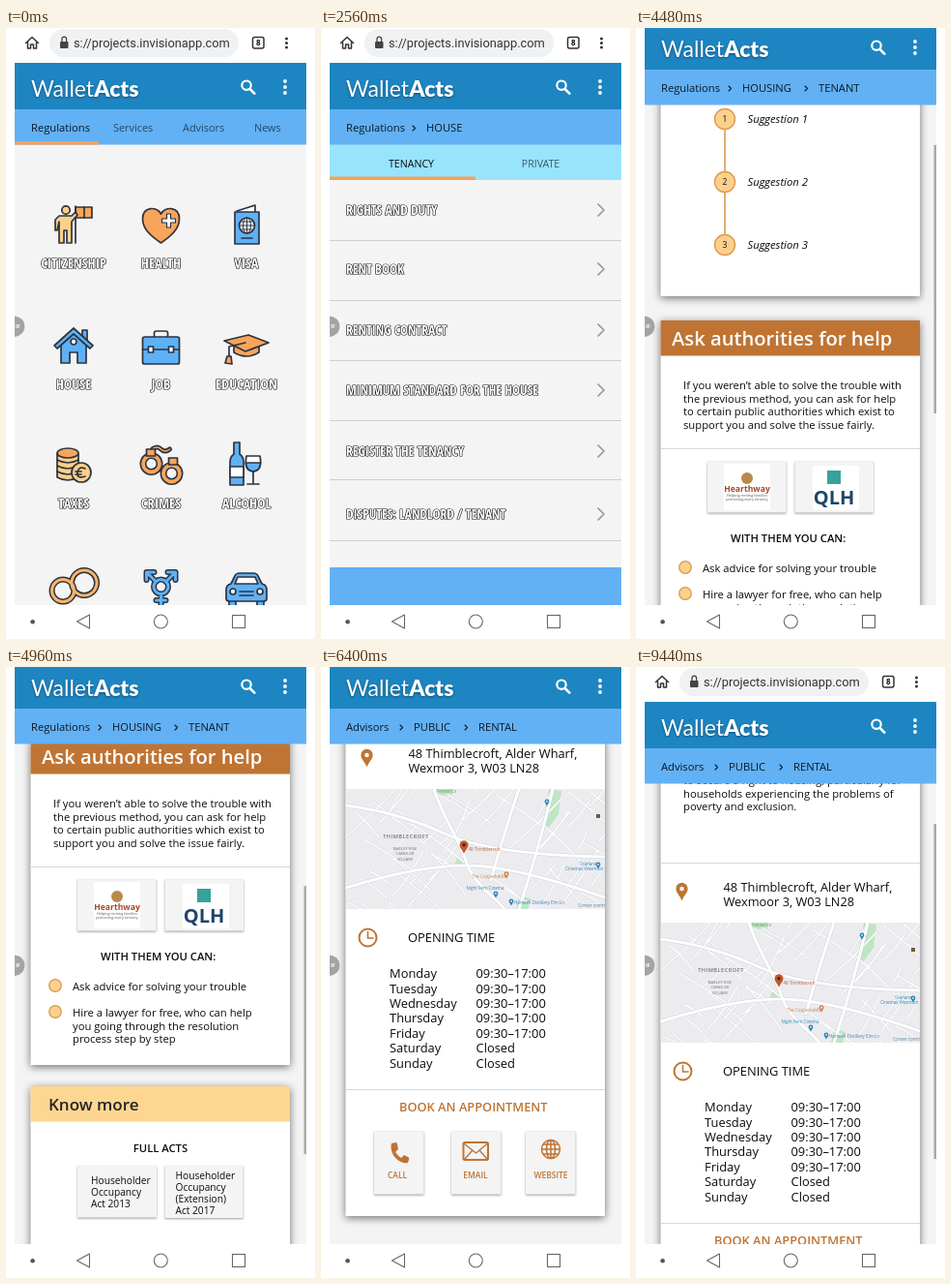
Animation, 320 px wide and 631 px high, one loop 9.6 s. Source, as an HTML page:

```html
<!DOCTYPE html>
<html lang="en">
<head>
<meta charset="utf-8">
<title>Pocket guide walkthrough</title>
<style>
html, body { margin: 0; width: 100%; height: 100%; overflow: hidden; background: #fff; }
svg { display: block; width: 320px; height: 631px; font-family: "Open Sans", "Noto Sans", sans-serif; }
.card { filter: drop-shadow(0 2px 4px rgba(0,0,0,.55)); }
.tile { filter: drop-shadow(0 1px 1px rgba(0,0,0,.4)); }
.caps { font-family: "Open Sans Condensed", "Open Sans", "Noto Sans", sans-serif; font-stretch: 75%;
  fill: #fff; stroke: #111; stroke-width: 1.2px; paint-order: stroke; stroke-linejoin: round; }
.ico { stroke: #2d3340; stroke-width: 1.7; stroke-linejoin: round; stroke-linecap: round; fill: none; }
.ico .b { fill: #5fb1f5; } .ico .o { fill: #f8a55c; } .ico .y { fill: #fbd08a; } .ico .w { fill: #fff; }
.line { fill: none; stroke-linecap: round; stroke-linejoin: round; }
</style>
</head>
<body>
<svg id="stage" viewBox="0 0 320 631"></svg>
<script>
const INK = '#0c0c0c', NAVY = '#0d1824', BROWN = '#bf7433', SAND = '#fdd691';

// Text helper: y is the middle of the capitals.
const txt = (x, y, s, size = 11.25, attrs = '') =>
  `<text x="${x}" y="${(y + size * .357).toFixed(2)}" font-size="${size}" ${/fill=|class=/.test(attrs) ? '' : `fill="${INK}"`} ${attrs}>${s}</text>`;
const mid = (x, y, s, size, attrs = '') => txt(x, y, s, size, `text-anchor="middle" ${attrs}`);
const lines = (x, y, step, rows, size) => rows.map((r, i) => txt(x, y + i * step, r, size)).join('');
const box = (x, y, w, h, fill, attrs = '') =>
  `<rect x="${x}" y="${y}" width="${w}" height="${h}" fill="${fill}" ${attrs}/>`;
const dot = (x, y, r, fill, attrs = '') => `<circle cx="${x}" cy="${y}" r="${r}" fill="${fill}" ${attrs}/>`;
const path = (d, stroke, w = 1, attrs = '') =>
  `<path class="line" d="${d}" stroke="${stroke}" stroke-width="${w}" ${attrs}/>`;
const group = (id, s) => `<g id="${id}">${s}</g>`;
const card = (y, h, title, fill, color, x, size) =>
  box(25.5, y, 268.5, h, '#fff', 'class="card"') +
  (title ? box(25.5, y, 268.5, 36.5, fill) + txt(x, y + 18.5, title, size, `font-weight="600" fill="${color}"`) : '');
const tile = (x, y, w, h) => box(x, y, w, h, '#f4f4f4', 'class="tile"');
const rule = y => box(25.5, y, 268.5, 1, '#d8d8d8');
const twoTone = (d, color, outer, inner) =>
  `<path d="${d}" stroke-width="${outer}"/><path d="${d}" stroke="${color}" stroke-width="${inner}"/>`;
const ring = (x, y, r) => `M${x - r} ${y}a${r} ${r} 0 1 1 ${2 * r} 0a${r} ${r} 0 1 1 ${-2 * r} 0`;
const SEMI = 'font-weight="600"';
const ORANGE = '#f8a55c', BLUE = '#5fb1f5';

// Home icons, drawn around their own centre.
const ICONS = {
  CITIZENSHIP: `<path class="o" d="M2-18h17v11H2z"/><path d="M2-19V19M11-18v11"/><circle class="y" cx="-8" cy="-15" r="4.200"/>
    <path class="y" d="M-15-9h13l4-4 2 3-6 7v22h-5V6h-3v13h-5V-3l-2 9h-2V-5z"/>`,
  HEALTH: `<path class="o" d="M0 19C-10 12-19 5-19-6c0-13 15-13 19-5 4-8 19-8 19 5C19 5 10 12 0 19z"/>
    <path class="w" stroke-width="1.200" d="M6-11h4v5h5v4h-5v5H6v-5H1v-4h5z"/>`,
  VISA: `<path class="w" d="M-10-14L9-20v7"/><path class="b" d="M-12-13H13V20H-12z"/><circle class="w" cx=".5" cy="1" r="8"/>
    <path stroke-width="1" d="M-7 1H8M.5-7V9M-5-3H6M-5 5H6"/><ellipse cx=".5" cy="1" rx="4" ry="8" stroke-width="1"/><path d="M-5 14H6"/>`,
  HOUSE: `<path class="b" d="M9-16h5v11H9z"/><path class="b" d="M-13-2L0-14 13-2V18H4V7h-8v11h-9z"/>
    <path class="b" d="M-20 0L0-18 20 0l-3 3L0-12-17 3z"/><circle class="w" cx="0" cy="-4" r="3"/>`,
  JOB: `<path d="M-7-9v-4q0-2 2-2H5q2 0 2 2v4"/><rect class="b" x="-19" y="-9" width="38" height="28" rx="2"/>
    <path d="M-19 4h38"/><path class="w" d="M-13 1h5v6h-5zM8 1h5v6H8z"/>`,
  EDUCATION: `<path class="o" d="M-13-3v10q13 8 26 0V-3"/><path class="o" d="M-23-5L2-11 23-3-1 6z"/>
    <path d="M-1-3L-18 1V11"/><path class="o" d="M-20 11h4l1 8-7-1z"/>`,
  TAXES: `<path class="y" d="M-17-10V14q11 6 22 0V-10"/><path d="M-17-4q11 6 22 0M-17 2q11 6 22 0M-17 8q11 6 22 0"/>
    <ellipse class="o" cx="-6" cy="-11" rx="11" ry="5"/><circle class="y" cx="8" cy="9" r="10"/>
    <path d="M12 5q-7-3-8 4t8 4M2 8h6M2 11h6"/>`,
  CRIMES: twoTone('M-9-15q5-4 9 0t9 0', ORANGE, 5, 1.500) + twoTone(ring(-10, 0, 8.500) + ring(11, 10, 8.500), ORANGE, 7, 3.800) +
    '<path class="o" d="M-15-15h9v7h-9zM8-6h9v7H8z"/>',
  ALCOHOL: `<path class="b" d="M-13-22h6v12q4 3 4 8v24h-14V-2q0-5 4-8z"/><path class="w" d="M-17 3h14v11h-14z"/>
    <path class="w" d="M0-8h14q3 15-7 16-10-1-7-16z"/><path class="b" d="M-.5-1h15q0 8-7.500 9-7.500-1-7.500-9z"/><path d="M7 8v13M1 21h12"/>`
};
const ARROWS = 'M5-5l9-9M7-15h8v8M-5-5l-9-9M-7-15h-8v8M0 8v12M-5 14H5';
const LAST_ROW = [
  twoTone(ring(-11, 4, 11.500) + ring(11, -4, 13), '#f8b568', 6, 3),
  twoTone(ARROWS + ring(0, 0, 7.500), BLUE, 6, 3),
  `<path class="b" d="M-18 13h7v7h-7zM11 13h7v7h-7z"/><path class="b" d="M-21 3q0-5 5-6l4-8q1-3 5-3H7q4 0 5 3l4 8q5 1 5 6v9q0 3-3 3H-18q-3 0-3-3z"/>
    <path class="w" d="M-12-3l3-7H9l3 7z"/><circle class="w" cx="-14" cy="5" r="3"/><circle class="w" cx="14" cy="5" r="3"/><path d="M-7 9H7M-7 5H7"/>`
];
const COLS = [70, 160.5, 249];
const icon = (x, y, s) => `<g class="ico" transform="translate(${x} ${y})">${s}</g>`;
const homePage = () => Object.entries(ICONS).map(([name, art], i) => {
  const x = COLS[i % 3], row = i / 3 | 0;
  return icon(x, [203, 328, 450][row], art) + mid(x, [243, 368, 491][row], name, 14.3, 'class="caps"');
}).join('') + LAST_ROW.map((art, i) => icon(COLS[i], 577, art)).join('');

const listPage = () => box(9, 120, 302, 37, '#99e4fd') + box(9, 153.5, 151, 3.5, '#f3a15d') +
  mid(93.5, 140, 'TENANCY', 10.6) + mid(227.5, 140, 'PRIVATE', 10.6, 'fill="#35586b"') +
  [['RIGHTS AND DUTY', 188, 219], ['RENT BOOK', 249, 281], ['RENTING CONTRACT', 312, 343],
    ['MINIMUM STANDARD FOR THE HOUSE', 374, 405], ['REGISTER THE TENANCY', 437, 466], ['DISPUTES: LANDLORD / TENANT', 502, 529]]
    .map(([s, y, b]) => txt(26, y, s, 13.5, 'class="caps"') + path(`M287 ${y - 6}l6 6-6 6`, '#999', 1.7) + box(9, b, 302, 1, '#cfcfcf')).join('') +
  box(9, 557, 302, 39, '#62b1f4');

const badge = (x, y, name, tag) => dot(x, y - 7, 6, '#b98a4c') + mid(x, y + 4, name, 8.6, 'font-weight="700" fill="#a8482b"') +
  tag.map((s, i) => mid(x, y + 10.5 + i * 4, s, 3.8, 'fill="#555"')).join('');
const TAG = ['Helping renting families', 'protecting every tenancy'];

function tenantPage() {
  const first = card(-38, 444, 'Speak with each other', BROWN, '#fff', 37, 20.2) +
    lines(45, 36, 13.5, ['Before you start any other procedure,', 'try to find a solution together with', 'the other side of the contract.',
      'As the relation between you and your', 'landlord should be respectful from both',
      'the sides, the best practice is to solve the', 'issue talking honestly with you landlord.']) +
    txt(65, 162, 'SUGGESTIONS FOR YOUR MEETING:', 11.25, SEMI) + path('M92 223V353', '#dc9b52', 1.6) +
    [223, 288, 353].map((y, i) => dot(92, y, 10.5, '#fdd08c', 'stroke="#dc9b52" stroke-width="1.4"') +
      mid(92, y, i + 1, 8.5) + txt(115.5, y, `Suggestion ${i + 1}`, 11.3, 'font-style="italic"')).join('');
  return `<g transform="translate(0 -357)">${first}</g>` +
    card(74, 337, 'Ask authorities for help', BROWN, '#fff', 37, 20.2) +
    lines(49, 141, 13.5, ['If you weren’t able to solve the trouble with', 'the previous method, you can ask for help',
      'to certain public authorities which exist to', 'support you and solve the issue fairly.']) +
    rule(206) + tile(74, 219.5, 81.5, 53) + tile(164.5, 219.5, 81.5, 53) + box(91, 222, 48, 48, '#fff') + box(183, 224, 48, 46, '#fff') +
    badge(115, 244, 'Hearthway', TAG) + box(198, 229, 14, 14, '#35a39b') +
    mid(205, 257, 'QLH', 20, 'font-weight="700" fill="#1f4468"') +
    txt(98, 298.5, 'WITH THEM YOU CAN:', 11.25, SEMI) +
    [329, 356].map(y => dot(51, y, 6.3, '#fdd08c', 'stroke="#d79a55" stroke-width="1.3"')).join('') +
    txt(69, 330, 'Ask advice for solving your trouble') +
    lines(69, 357, 13.5, ['Hire a lawyer for free, who can help', 'you going through the resolution', 'process step by step']) +
    card(433, 327, 'Know more', SAND, '#242424', 44, 17) +
    mid(160, 496.5, 'FULL ACTS', 11.25, SEMI) + tile(74, 515, 82, 53.5) + tile(164.5, 515, 81, 54) +
    lines(88, 530, 12, ['Householder', 'Occupancy', 'Act 2013'], 10.2) +
    lines(175.5, 525, 12.1, ['Householder', 'Occupancy', '(Extension)', 'Act 2017'], 10.2);
}

const pin = (x, y, k, fill, hole) => `<g transform="translate(${x} ${y}) scale(${k})"><path fill="${fill}" d="M0 9C-2 4-6 1-6-3a6 6 0 0 1 12 0c0 4-4 7-6 12z"/>${dot(0, -3, 2.2, hole)}</g>`;

function cityMap() {
  let seed = 41, roads = '';
  const rnd = () => (seed = seed * 16807 % 2147483647) / 2147483647;
  for (let i = 0; i < 58; i++) {
    const x = 26 + rnd() * 268, y = 126 + rnd() * 124, a = (i % 2 ? .5 : -1.15) + rnd() * .4, n = 18 + rnd() * 65;
    const dx = n * Math.cos(a), dy = n * Math.sin(a);
    roads += `M${x.toFixed(1)} ${y.toFixed(1)}q${(dx / 2 + 4).toFixed(1)} ${(dy / 2).toFixed(1)} ${dx.toFixed(1)} ${dy.toFixed(1)}`;
  }
  const main = 'M117 126C128 160 142 175 150 200S178 235 190 250M26 143Q80 150 128 172T294 196M205 126Q190 170 176 220M26 228Q100 205 150 205T294 238M240 126Q225 190 205 250';
  const label = (x, y, s, fill, size = 4.5) => mid(x, y, s, size, `fill="${fill}"`);
  const TEAL = '#2d86b8', GREY = '#70757b';
  return `<g clip-path="url(#mapClip)">` + box(25.5, 126, 268.5, 124, '#ececef') +
    `<path fill="#bfe5c2" d="M121 126h17l-3 7-13-1zM236 126l13 2-3 24-12 16-3-12zM205 236l12 3-3 11h-12zM141 197l7 2-3 8-7-3z"/>` +
    path(roads, '#d3d6db', 2.2) + path(roads, '#fff', 1.4) + path(main, '#cfd3d9', 4) + path(main, '#fff', 3) +
    mid(88, 175, 'THIMBLECROFT', 5.6, `fill="${GREY}" letter-spacing=".5" font-weight="600"`) +
    ['BARLEY RISE', 'CANDLER', 'SQUARE'].map((s, i) => label(87, 187 + i * 5.5, s, GREY, 4.3)).join('') +
    label(130, 128, 'Fennel Ln', '#4f9b5c') + label(169, 188, '48 Thimblecroft', '#b0623a') +
    label(174, 216, 'The Copperkettle', '#d0844f') + label(170, 228, 'Night Fern Cinema', TEAL) +
    label(226, 243, 'Hartwell Distillery Elm Ln', TEAL) + label(277, 203, 'Starlane', TEAL) + label(273, 208, 'Cinemas Wexmoor', TEAL) +
    label(282, 246, 'Corner commu', '#4c7f9c') + pin(192, 215, .42, '#d0844f', '#fff') +
    [[181, 235], [197, 243], [287, 205], [234, 140]].map(p => pin(...p, .4, TEAL, '#fff')).join('') +
    box(285, 152, 4, 4, '#735a35') + pin(148, 186, .75, '#c45a2b', '#4b2010') + '</g>';
}

function advisorPage() {
  const days = ['Monday', 'Tuesday', 'Wednesday', 'Thursday', 'Friday', 'Saturday', 'Sunday'];
  const gold = `stroke="${BROWN}" fill="none"`;
  return card(-336, 903) + `<g transform="translate(160 -235) scale(2)">${badge(0, 0, 'Hearthway', TAG)}</g>` +
    lines(49, -102, 13.5, ['Hearthway is a national housing charity.', 'It gives free and confidential advice to', 'people with renting problems, and helps',
      'families to find and to keep a home.', 'The purpose of the organisation is', 'to protect every tenant and', 'to secure a right to housing, particularly for',
      'households experiencing the problems of', 'poverty and exclusion.']) +
    rule(64) + pin(47.5, 94, 1.02, BROWN, '#fff') + lines(90.5, 89, 15.3, ['48 Thimblecroft, Alder Wharf,', 'Wexmoor 3, W03 LN28'], 12.8) +
    cityMap() + dot(48.5, 279.5, 9, 'none', `stroke="${BROWN}" stroke-width="2"`) + path('M48.5 273.5v6.5h5.5', BROWN, 1.6) +
    txt(90, 279.5, 'OPENING TIME', 12.9) +
    lines(71, 316.5, 15.45, days, 12.9) + lines(160.5, 316.5, 15.45, days.map((d, i) => i < 5 ? '09:30–17:00' : 'Closed'), 12.9) +
    rule(436) + txt(81, 454.5, 'BOOK AN APPOINTMENT', 12.8, `${SEMI} fill="${BROWN}"`) +
    [[55, 'CALL', 79], [135, 'EMAIL', 160], [212, 'WEBSITE', 238]].map(([x, s, c]) => tile(x, 479.5, 51.5, 65) +
      mid(c, 524.5, s, 8.5, `${SEMI} fill="${BROWN}"`)).join('') +
    `<path fill="${BROWN}" d="M73 492l4-1q2 0 2 2l1 5-3 3q3 4 6 6l3-3 4 2q2 1 1 3l-1 3c-9 2-20-9-17-20z"/>` +
    `<rect x="147.5" y="491" width="25.5" height="18" rx="1.5" ${gold} stroke-width="2"/>` + path('M148.5 492.5l12 9.5 11.5-9.5M149 508l7.5-8.5M172 508l-7.5-8.5', BROWN, 1.4) +
    `<g ${gold} stroke-width="1.5"><circle cx="238" cy="498" r="9.5"/><ellipse cx="238" cy="498" rx="4.5" ry="9.5"/><path d="M238 488.5v19M228.5 498h19M230 493h16M230 503h16"/></g>`;
}

const crumbs = (...parts) => parts.map(([x, s], i) =>
  (i ? path(`M${x - 14} 101l2.5 2.5-2.5 2.5`, NAVY, 1.1) : '') + txt(x, 103, s, 11.2, `fill="${NAVY}"`)).join('');
const tabs = () => box(9, 117, 87, 3.5, '#f3a15d') + txt(26, 103, 'Regulations', 11.2, `fill="${NAVY}"`) +
  [[111, 'Services'], [183, 'Advisors'], [257, 'News']].map(([x, s]) => txt(x, 103, s, 10.9, 'fill="#234a6b"')).join('');
const kebab = (x, y, gap, r, fill) => [-gap, 0, gap].map(d => dot(x, y + d, r, fill)).join('');

const topBar = () => box(9, -10, 302, 46, '#fff') + path('M20.5 15.5l6.5-6 6.5 6M22.5 14.5v6.5h3v-4h3v4h3v-6.5', '#333', 1.5) +
  box(45, 1, 196, 29, '#f0f1f2', 'rx="14.5"') + box(56, 14, 8.5, 7, '#444', 'rx="1"') + path('M58 14v-2.5a2.3 2.3 0 0 1 4.6 0V14', '#444', 1.3) +
  txt(70, 15.5, 's://projects.invisionapp.com', 12.8, 'fill="#333" style="font-family:Roboto,sans-serif"') +
  box(255.5, 9.5, 11.5, 11.5, 'none', 'rx="2" stroke="#333" stroke-width="1.5"') + mid(261.2, 15.3, '8', 8, 'font-weight="700"') +
  kebab(290.5, 15.5, 4.6, 1.5, '#333') +
  box(9, 36, 302, 48, '#1d85c1') + box(9, 84, 302, 36.5, '#62b1f4') +
  '<text x="26" y="70.5" font-size="23" fill="#fff" style="font-family:Lato,sans-serif;filter:drop-shadow(0 1px 1px rgba(0,30,60,.55))">Wallet<tspan font-weight="900">Acts</tspan></text>' +
  dot(249, 59.2, 4.7, 'none', 'stroke="#fff" stroke-width="2.2"') + path('M252.7 63l4.6 4.6', '#fff', 2.6) + kebab(289, 61, 6, 1.9, '#fff') +
  group('homeBar', tabs()) + group('listBar', crumbs([26, 'Regulations'], [109, 'HOUSE'])) +
  group('tenantBar', crumbs([26, 'Regulations'], [110, 'HOUSING'], [189, 'TENANT'])) +
  group('advisorBar', crumbs([26, 'Advisors'], [96, 'PUBLIC'], [163, 'RENTAL']));

const navBar = () => box(0, 596, 320, 35, '#fff') + dot(27.6, 613.3, 2.3, '#555') +
  path('M73.5 613l13-7v14z', '#666', 1.1) + dot(160.3, 613, 7, 'none', 'stroke="#666" stroke-width="1.1"') +
  box(234.5, 606.5, 13, 13, 'none', 'stroke="#666" stroke-width="1.1"');

document.getElementById('stage').innerHTML =
  '<defs><clipPath id="screen"><rect x="9" y="0" width="302" height="631"/></clipPath><clipPath id="mapClip"><rect x="25.5" y="126" width="268.5" height="124"/></clipPath></defs>' +
  box(0, 0, 320, 631, '#fff') + '<g clip-path="url(#screen)">' + box(9, 0, 302, 596, '#f4f4f4') +
  group('home', homePage()) + group('list', listPage()) + group('tenant', tenantPage()) + group('advisor', advisorPage()) +
  group('top', topBar()) + box(308.5, 0, 2.5, 277, '#a9a9a9', 'id="thumb"') +
  dot(8.5, 308.2, 10.8, '#a3a3a3') + txt(10, 308.2, 'IF', 5.5, 'fill="#fff" font-weight="700"') + navBar() + '</g>';

const $ = id => document.getElementById(id);
const LOOP = 9600, STEP = 160, BAR = 41;
const SCREENS = [['home', 0], ['list', 800], ['tenant', 2720], ['advisor', 5760]];
// [time, page offset, how far the address bar is shown]
const MOVES = {
  tenant: [[3360, -41, 1], [3520, -22, .55], [3680, 55, 0], [3840, 133, 0], [4000, 187, 0], [4160, 224, 0], [4480, 262, 0],
    [4640, 300, 0], [4800, 398, 0], [4960, 490, 0], [5120, 514, 0], [5440, 530, 0]],
  advisor: [[5760, 0, 0], [5920, 112, 0], [6080, 265, 0], [6240, 385, 0], [6400, 431, 0],
    [8800, 431, 0], [8960, 410, .4], [9120, 362, 1], [9280, 318, 1], [9440, 293, 1]]
};
const PAGES = { tenant: { base: 490, ratio: .4615, length: 277 }, advisor: { base: 431, ratio: .553, length: 346 } };

function poseAt(keys, t) {
  const i = keys.findIndex(k => k[0] > t);
  if (i < 0) return keys[keys.length - 1].slice(1);
  if (!i) return keys[0].slice(1);
  const a = keys[i - 1], b = keys[i], p = (t - a[0]) / (b[0] - a[0]);
  return [1, 2].map(n => a[n] + (b[n] - a[n]) * p);
}

function draw(t) {
  const name = SCREENS.filter(s => s[1] <= t).pop()[0];
  for (const [id] of SCREENS) {
    $(id).style.display = $(id + 'Bar').style.display = id === name ? '' : 'none';
  }
  const page = PAGES[name], [offset, shown] = page ? poseAt(MOVES[name], t) : [0, 1];
  $('top').setAttribute('transform', `translate(0 ${-BAR * (1 - shown)})`);
  const scrolling = t >= 3520 && t < 5600 || t >= 5760 && t < 6400 || t >= 8960;
  $('thumb').style.display = page && scrolling ? '' : 'none';
  if (!page) return;
  $(name).setAttribute('transform', `translate(0 ${page.base - offset})`);
  $('thumb').setAttribute('y', Math.max(0, offset) * page.ratio);
  $('thumb').setAttribute('height', page.length);
}

const start = performance.now();
function tick() {
  const t = (performance.now() - start) % LOOP;
  draw(Math.floor(t / STEP) * STEP);
  requestAnimationFrame(tick);
}
tick();
</script>
</body>
</html>
```
